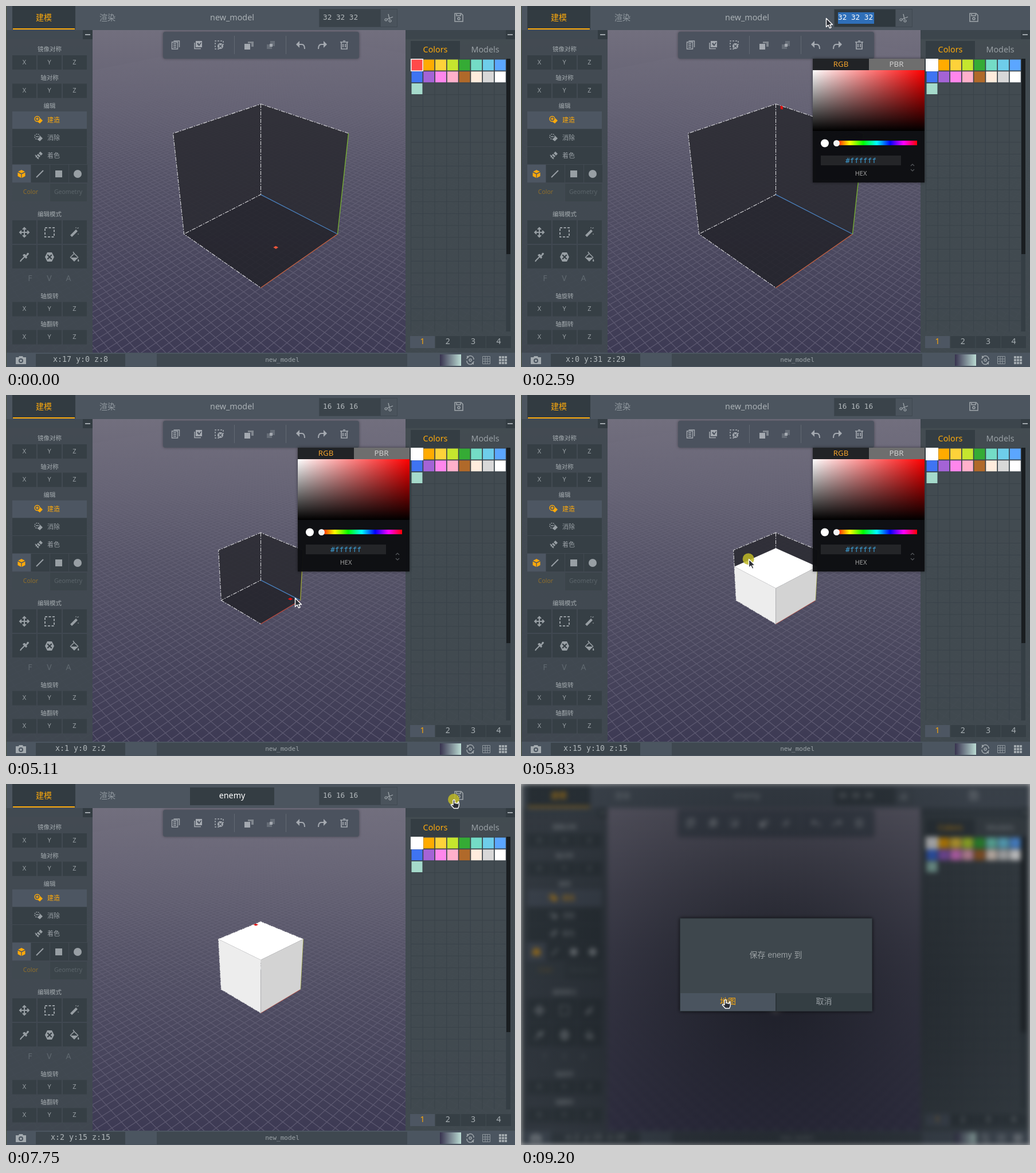
These frames come from a looping animation (888 by 630 pixels, 9250 ms). An HTML page with a canvas:

```html
<!DOCTYPE html>
<html lang="zh">
<head>
<meta charset="utf-8">
<title>Voxel editor</title>
<style>
html, body { margin: 0; width: 100%; height: 100%; overflow: hidden; background: #414a52; }
canvas { display: block; width: 888px; height: 630px; }
</style>
</head>
<body>
<canvas id="stage" width="888" height="630"></canvas>
<script>
const W = 888, H = 630, LOOP = 9250, STEP = 120, FIRST = 310;
const stage = document.getElementById('stage').getContext('2d');
const layer = document.createElement('canvas');
layer.width = W;
layer.height = H;
const g = layer.getContext('2d');

const UI = '"Noto Sans", "Noto Sans CJK SC", "Noto Sans CJK", sans-serif';
const MONO = '"DejaVu Sans Mono", monospace';
const DARK = '#363f45', LIT = '#4d5662', GOLD = '#fca90c', GREY = '#989fa4';

const clamp = (v, a = 0, b = 1) => Math.min(b, Math.max(a, v));

function box(c, x0, y0, x1, y1, fill) {
  c.fillStyle = fill;
  c.fillRect(x0, y0, x1 - x0, y1 - y0);
}

function text(c, s, x, y, size, fill, align = 'center', family = UI) {
  c.font = `${size}px ${family}`;
  c.textAlign = align;
  c.textBaseline = 'middle';
  c.fillStyle = fill;
  c.fillText(s, x, y + 0.5);
}

function disc(c, x, y, r, fill) {
  c.beginPath();
  c.arc(x, y, r, 0, Math.PI * 2);
  c.fillStyle = fill;
  c.fill();
}

// Icons are drawn around their own centre.
function icon(x, y, color, solid, outline, width = 1.5) {
  g.save();
  g.translate(x, y);
  g.fillStyle = g.strokeStyle = color;
  g.lineWidth = width;
  if (solid) g.fill(new Path2D(solid), 'evenodd');
  if (outline) g.stroke(new Path2D(outline));
  g.restore();
}

// ---- timeline ----

const PATH = [
  [310, 722, 104], [670, 722, 104], [1150, 600, 135], [1510, 485, 96], [1630, 480, 91],
  [1990, 604, 21], [2110, 604, 21], [2350, 532, 21], [4270, 532, 21], [5110, 504, 354],
  [5230, 510, 357], [5950, 374, 272], [6070, 374, 272], [6310, 434, 246], [6430, 428, 120],
  [6550, 424, 21], [7390, 424, 21], [7750, 781, 27], [7870, 781, 27], [8110, 690, 78],
  [8830, 356, 376], [9250, 356, 376]
];
const PRESSED = [[430, 550], [910, 1750], [2110, 2590], [5230, 6190], [6550, 6790], [7750, 7870], [9050, 9150]];
const HOVER = [
  [0, 17, 0, 8, 'floor'], [1750, 0, 31, 29, 'wall'], [4390, 0, 15, 6, 'wall'], [4750, 0, 11, 4, 'wall'],
  [4870, 0, 7, 3, 'wall'], [4990, 0, 3, 2, 'wall'], [5110, 1, 0, 2, 'floor'], [5230, 0, 0, 0, 'floor'],
  [5350, 15, 15, 15, ''], [6190, 12, 15, 13, 'top'], [6310, 5, 15, 14, 'top'], [6430, 2, 15, 15, 'top']
];

function pointer(t) {
  const i = PATH.findIndex(p => p[0] > t);
  const [t0, x0, y0] = PATH[i - 1], [t1, x1, y1] = PATH[i];
  const k = (t - t0) / (t1 - t0);
  return { x: x0 + (x1 - x0) * k, y: y0 + (y1 - y0) * k };
}

function pickedColor(t) {
  if (t < 910) return [255, 74, 74];
  if (t >= 1510) return [255, 255, 255];
  const p = pointer(t);
  const sat = clamp((p.x - 509) / 195), val = clamp(1 - (p.y - 112) / 106);
  const low = Math.round(255 * val * (1 - sat));
  return [Math.round(255 * val), low, low];
}

function filled(t) {
  if (t < 5350) return null;
  const n = clamp(((t - 5350) / STEP + 1) / 6) * 2;
  const side = Math.ceil(16 * Math.min(1, n));
  return [side, Math.max(1, Math.ceil(16 * (n - 1))), side];
}

function stateAt(time) {
  const t = time < FIRST ? 0 : FIRST + STEP * Math.floor((time - FIRST) / STEP);
  const s = { t, size: t < 4150 ? 32 : 16, rgb: pickedColor(t), fill: filled(t) };
  s.hover = HOVER.filter(h => h[0] <= t).pop();
  if (s.fill && t < 6190) s.hover = [t, ...s.fill.map(n => n - 1), ''];
  s.picker = t >= 550 && t < 7750;
  s.dims = t < 2830 ? '32 32 32' : '16 16 16'.slice(0, (t - 2830) / STEP + 1);
  s.dimsFocus = t >= 2110 && t < 4390;
  s.dimsMark = t >= 2230 && t < 2830 ? (t < 2350 ? 565 : 553) : 0;
  s.title = t < 6910 ? 'new_model' : 'enemy'.slice(0, (t - 6910) / STEP + 1);
  s.titleFocus = t >= 6550 && t < 7990;
  s.titleMark = t === 6790;
  s.dim = t < 7870 ? 0 : t < 7990 ? 1 : 2;
  s.dialog = t >= 8110;
  s.cursor = t ? pointer(t) : null;
  s.press = PRESSED.some(([a, b]) => (time >= 9050 ? time : t) >= a && (time >= 9050 ? time : t) < b);
  return s;
}

// ---- 3D scene ----

const FOCAL = 760, DIST = 120.4, SIN = 0.5, COS = 0.866, R2 = Math.SQRT2;

function project(size, x, y, z) {
  const u = (size - x - z) / R2, d = (z - x) / R2, h = y - size / 2;
  const depth = DIST + d * COS - h * SIN;
  return [444.5 + FOCAL * u / depth, 316 - FOCAL * (d * SIN + h * COS) / depth];
}

function trace(size, points, close) {
  g.beginPath();
  points.forEach(p => g.lineTo(...project(size, ...p)));
  if (close) g.closePath();
}

function face(size, points, fill) {
  trace(size, points, true);
  g.fillStyle = fill;
  g.fill();
}

function edge(size, points, color) {
  trace(size, points);
  g.strokeStyle = color;
  g.stroke();
}

function floorGrid(size) {
  const fade = g.createLinearGradient(0, 50, 0, 600);
  fade.addColorStop(0, 'rgba(170,165,180,0)');
  fade.addColorStop(0.3, 'rgba(160,155,175,.1)');
  fade.addColorStop(1, 'rgba(160,155,175,.3)');
  g.strokeStyle = fade;
  g.lineWidth = 1.3;
  g.beginPath();
  for (let i = -220; i <= 220; i += 2) {
    // Each line stops before it passes behind the camera.
    const near = Math.min(220, i + 140), far = Math.max(-220, i - 140);
    g.moveTo(...project(size, near, 0, i));
    g.lineTo(...project(size, -220, 0, i));
    g.moveTo(...project(size, i, 0, far));
    g.lineTo(...project(size, i, 0, 220));
  }
  g.stroke();
}

function scene(s) {
  const n = s.size;
  const sky = g.createLinearGradient(0, 42, 0, 605);
  sky.addColorStop(0, '#726f7e');
  sky.addColorStop(0.45, '#555367');
  sky.addColorStop(1, '#3d3a54');
  box(g, 0, 0, W, H, sky);
  floorGrid(n);

  face(n, [[0, 0, 0], [n, 0, 0], [n, 0, n], [0, 0, n]], 'rgba(34,34,41,.86)');
  face(n, [[0, 0, 0], [0, n, 0], [0, n, n], [0, 0, n]], 'rgba(42,42,49,.87)');
  face(n, [[n, 0, n], [n, n, n], [0, n, n], [0, 0, n]], 'rgba(42,42,49,.87)');
  g.lineWidth = 1.1;
  g.setLineDash([7, 2, 2, 2]);
  edge(n, [[0, n, 0], [0, n, n], [n, n, n], [n, 0, n], [n, 0, 0]], '#d5d5d8');
  edge(n, [[0, n, n], [0, 0, n], [n, 0, n]], '#d5d5d8');
  g.setLineDash([]);
  g.lineWidth = 1.3;
  edge(n, [[0, 0, 0], [n, 0, 0]], n === 32 ? '#c6603e' : '#b8483c');
  edge(n, [[0, 0, 0], [0, 0, n]], '#4a80bd');
  edge(n, [[0, 0, 0], [0, n, 0]], n === 32 ? '#79b432' : '#a0a83a');

  if (s.fill) {
    const [x, y, z] = s.fill;
    face(n, [[0, y, 0], [x, y, 0], [x, y, z], [0, y, z]], '#fff');
    face(n, [[x, 0, 0], [x, y, 0], [x, y, z], [x, 0, z]], '#ededed');
    face(n, [[0, 0, 0], [0, y, 0], [x, y, 0], [x, 0, 0]], '#d3d3d3');
  }
  const [, x, y, z, side] = s.hover;
  const color = s.t < 1750 ? '#ea553b' : '#e01212';
  if (side === 'wall') face(n, [[0, y, z], [0, y + 1, z], [0, y + 1, z + 1], [0, y, z + 1]], color);
  else if (side) {
    const top = side === 'top' ? y + 1 : y;
    face(n, [[x, top, z], [x + 1, top, z], [x + 1, top, z + 1], [x, top, z + 1]], color);
  }
}

// ---- interface ----

const ARROWS = 'M0-8V8M-8 0H8M-3-5L0-8L3-5M-3 5L0 8L3 5M-5-3L-8 0L-5 3M5-3L8 0L5 3';
const RING = 'M2-2a4.5 4.5 0 1 0-9 0a4.5 4.5 0 1 0 9 0';
const BLOCK = 'M3-3L7 1L2 6L-2 3Z';

function topBar(s) {
  box(g, 0, 0, W, 42, '#4c555f');
  box(g, 11, 0, 121, 41, '#323b41');
  box(g, 12, 39, 120, 41, GOLD);
  text(g, '建模', 66, 21, 14, GOLD);
  text(g, '渲染', 177, 21, 14, '#929aa0');
  if (s.titleFocus) box(g, 321, 6, 468, 37, '#343d43');
  if (s.titleMark) box(g, 357, 11, 432, 31, '#2f6fb8');
  text(g, s.title, 394.5, 20.5, 14.3, s.titleFocus ? '#fff' : '#a9b0b4');
  box(g, 546, 5, 683, 37, '#3f4850');
  box(g, 547, 6, 653, 36, s.dimsFocus ? '#2f383e' : '#3a434a');
  if (s.dimsMark) box(g, s.dimsMark, 11, 616, 31, '#2f6fb8');
  text(g, s.dims, 553, 20.5, 12.7, s.dimsFocus ? '#fff' : '#b4babd', 'left', MONO);
  box(g, 654, 6, 682, 36, '#4a535c');
  icon(668, 21, '#a3aaaf', '', 'M-1-7L1 2M7-2L-3 2M-3 3a2 2 0 1 0-4 0a2 2 0 1 0 4 0M4 5a2 2 0 1 0-4 0a2 2 0 1 0 4 0', 1.2);
  icon(790, 20, '#a0a7ac', '', 'M-7-7H4L7-4V7H-7ZM-4-6V-3H3V-6M2 2a2 2 0 1 0-4 0a2 2 0 1 0 4 0', 1.5);
}

function axisRow(label, y) {
  text(g, label, 76, y, 10.5, '#a4abaf');
  ['X', 'Y', 'Z'].forEach((c, i) => {
    box(g, 11 + 44 * i, y + 10, 53 + 44 * i, y + 35, DARK);
    text(g, c, 32 + 43.7 * i, y + 22, 11, GREY);
  });
}

function leftPanel() {
  box(g, 0, 42, 151, 605, 'rgba(64,73,80,.94)');
  box(g, 0, 42, 151, 58, '#414a52');
  box(g, 134, 42, 151, 58, '#333c42');
  box(g, 138, 49, 147, 51, '#a0a7ac');
  axisRow('镜像对称', 76);
  axisRow('轴对称', 125.5);
  axisRow('轴旋转', 506.5);
  axisRow('轴翻转', 555.5);
  text(g, '编辑', 76, 174.5, 10.5, '#a4abaf');
  text(g, '编辑模式', 76, 363.5, 10.5, '#a4abaf');

  ['建造', '消除', '着色'].forEach((label, i) => {
    const y = 199 + 31 * i;
    box(g, 11, y - 15, 141, y + 15, i ? DARK : LIT);
    text(g, label, 83, y, 11, i ? GREY : GOLD);
  });
  icon(57, 199, GOLD, BLOCK, RING + 'M-5-2H0M-2.5-4.5V.5', 1.4);
  g.setLineDash([2, 1.5]);
  icon(57, 230, GREY, BLOCK, RING, 1.4);
  g.setLineDash([]);
  icon(57, 230, GREY, '', 'M-5-2H0', 1.4);
  icon(57, 261, GREY, 'M3-7L7-3L4 0L0-4ZM-1-3L3 1L1 3L-3-1Z', 'M-6-1L0 6M-3 0L-5 3M0 3L-3 5', 1.5);

  for (let i = 0; i < 4; i++) box(g, 11 + 33 * i, 277, 43 + 33 * i, 308, i ? DARK : LIT);
  icon(27, 293, GOLD, 'M0-7L6-4L0-1L-6-4ZM-6.5-2.5L-.6 .5V7L-6.5 4ZM6.5-2.5L.6 .5V7L6.5 4Z');
  icon(59, 293, GREY, '', 'M-6 6L6-6', 2);
  box(g, 86, 287, 98, 299, GREY);
  disc(g, 125, 293, 7, GREY);
  box(g, 11, 310, 75, 341, '#404950');
  box(g, 77, 310, 141, 341, '#3b444a');
  text(g, 'Color', 43, 325, 10.5, '#8d6e2c');
  text(g, 'Geometry', 108.5, 325, 10.5, '#5b646a');

  for (let i = 0; i < 6; i++) {
    const x = 11 + 44 * (i % 3), y = i < 3 ? 374 : 417;
    box(g, x, y, x + 42, y + 41, DARK);
  }
  icon(32, 395, GREY, '', ARROWS, 2);
  g.setLineDash([4, 2.5]);
  icon(76, 395, GREY, '', 'M-8-8H8V8H-8Z', 2);
  g.setLineDash([]);
  icon(119, 395, GREY, 'M-7 5L3-5L6-2L-4 8ZM2-8l1-1l1 1l-1 1ZM6 3l1-1l1 1l-1 1Z', 'M5-7L8-8', 1);
  icon(32, 438, GREY, 'M1-5L3-3L5-7Q8-8 8-5L4-1L5 1L3 3L-3-3L-1-5Z', 'M1-1L-6 6L-7 8', 2);
  icon(76, 438, GREY, 'M-4-8H4L8 0L4 8H-4L-8 0ZM-3-4.5L-4.5-3L-1.5 0L-4.5 3L-3 4.5L0 1.5L3 4.5L4.5 3L1.5 0L4.5-3L3-4.5L0-1.5Z');
  icon(119, 438, GREY, 'M-7 1H7L0 8ZM7 3Q10 8 7 8Q5 8 7 3Z', 'M-7 1L0-6L7 1M0-6L-2-9', 1.5);
  ['F', 'V', 'A'].forEach((c, i) => text(g, c, 42 + 33.5 * i, 475.5, 14, '#606970'));
}

const SWATCHES = ('ff4a4a ffab00 fdd23a c5e62e 35ab35 74dcc6 6ecdea 5ba6ff ' +
  '3f74f2 a463d6 ff86ec ffb0cb b0692a ffecdd d8d8d8 ffffff a5dacb').split(' ');

function rightPanel(s) {
  box(g, 697, 42, W, 605, 'rgba(65,74,80,.95)');
  box(g, 697, 42, W, 58, '#3c454c');
  box(g, 872, 42, W, 58, '#333c42');
  box(g, 875, 49, 884, 51, '#a0a7ac');
  box(g, 706, 61, 792, 92, '#343d43');
  text(g, 'Colors', 749, 76.5, 14.3, GOLD);
  text(g, 'Models', 836, 76.5, 14.3, GREY);

  const pitch = 20.75;
  g.strokeStyle = '#394249';
  g.lineWidth = 1;
  g.beginPath();
  for (let i = 0; i <= 8; i++) {
    g.moveTo(706.5 + i * pitch, 92);
    g.lineTo(706.5 + i * pitch, 568);
  }
  for (let y = 92.5; y < 569; y += pitch) {
    g.moveTo(706, y);
    g.lineTo(872, y);
  }
  g.stroke();
  const current = `rgb(${s.rgb})`;
  SWATCHES.forEach((hex, i) => {
    const x = 707 + (i % 8) * pitch, y = 93 + (i >> 3) * pitch;
    if (i) box(g, x + 0.5, y + 0.5, x + 19.5, y + 19.5, '#' + hex);
  });
  box(g, 706, 92, 728, 114, '#fff');
  box(g, 707.5, 93.5, 726.5, 112.5, current);
  box(g, 873, 92, 880, 568, '#353e44');
  box(g, 873, 92, 880, 433, '#191d20');

  for (let i = 0; i < 4; i++) {
    const x = 705 + 44.3 * i;
    box(g, x, 576, x + 43, 597, i ? '#363f45' : LIT);
    text(g, i + 1, x + 21.5, 586, 14, i ? '#a9b0b4' : GOLD);
  }
}

function bottomBar(s) {
  box(g, 0, 605, W, H, '#4b5560');
  box(g, 52, 607, 208, 629, '#3b444b');
  box(g, 263, 607, 700, 629, '#3f4850');
  const [, x, y, z] = s.hover;
  text(g, `x:${x} y:${y} z:${z}`, 130, 617.5, 13.3, '#b0b7ba', 'center', MONO);
  text(g, 'new_model', 482, 617.5, 11, '#9ca3a8', 'center', MONO);
  icon(26, 618, '#a3aaaf', 'M-9-5H-4L-3-7H3L4-5H9V7H-9ZM4 1a4 4 0 1 0-8 0a4 4 0 1 0 8 0M2 1a2 2 0 1 0-4 0a2 2 0 1 0 4 0');
  const ramp = g.createLinearGradient(757, 0, 794, 0);
  ramp.addColorStop(0, '#37324e');
  ramp.addColorStop(1, '#bcdcd4');
  box(g, 757, 608, 794, 628, ramp);
  icon(810, 618, '#9fa6ab', 'M-6-3L-6-8L-2-5ZM6 3L6 8L2 5Z', 'M-6-2A6 6 0 0 1 6-1M6 2A6 6 0 0 1-6 1M2 0a2 2 0 1 0-4 0a2 2 0 1 0 4 0');
  icon(838, 618, '#8f979d', '', 'M-6.5-6.5H6.5V6.5H-6.5ZM-2-6.5V6.5M2-6.5V6.5M-6.5-2H6.5M-6.5 2H6.5', 1);
  for (let i = 0; i < 9; i++) {
    const px = 860 + (i % 3) * 5, py = 611 + Math.floor(i / 3) * 5;
    box(g, px, py, px + 4, py + 4, '#a3aaaf');
  }
}

function toolbar() {
  g.save();
  g.shadowColor = 'rgba(0,0,0,.35)';
  g.shadowBlur = 5;
  g.fillStyle = '#4b525e';
  g.beginPath();
  g.roundRect(274, 45, 342, 47, 4);
  g.fill();
  g.restore();
  const c = '#a4a9b0', dull = '#80868e';
  icon(296, 68, c, '', 'M-3.5-7H6.5V4M-6.5-5H3.5V7H-6.5ZM-4-2H1M-4 1H1M-4 4H1', 1.4);
  icon(335, 68, c, 'M-4-7H7V4H-4ZM-2-2L0-4L2-1L5-5L6-4L2 2Z', 'M-6-4V6.5H5', 1.5);
  g.setLineDash([3, 2]);
  icon(372, 68, c, '', 'M0 7H-7V-7H7V0', 1.5);
  g.setLineDash([]);
  icon(374, 70, c, 'M5 0a5 5 0 1 0-10 0a5 5 0 1 0 10 0M-2-3L-3-2L-1 0L-3 2L-2 3L0 1L2 3L3 2L1 0L3-2L2-3L0-1Z');
  box(g, 398, 52, 399, 84, '#626973');
  box(g, 488, 52, 489, 84, '#626973');
  icon(424, 68, c, 'M-8-2H2V8H-8Z');
  icon(424, 68, dull, 'M-2-6H8V3H4V-3H-2Z');
  icon(462, 68, '#666d77', 'M-7-1H2V7H-7ZM-1-7H7V2H-1Z');
  icon(462, 68, c, 'M-2-2H3V3H-2Z');
  icon(514, 68, c, 'M-8-1L-2-7V5Z', 'M-3-1H2Q7-1 7 7', 2);
  icon(552, 68, c, 'M8-1L2-7V5Z', 'M3-1H-2Q-7-1-7 7', 2);
  icon(590, 68, c, '', 'M-7-5H7M-2-7H2M-5-5V7H5V-5M-2-2V4M2-2V4', 1.7);
}

function picker(s) {
  g.save();
  g.shadowColor = 'rgba(0,0,0,.5)';
  g.shadowBlur = 5;
  box(g, 509, 92, 704, 308, 'rgba(13,14,18,.94)');
  g.restore();
  box(g, 509, 92, 607, 112, '#212326');
  box(g, 607, 92, 704, 112, '#6e6e6e');
  text(g, 'RGB', 558, 101.5, 13.3, '#f3a32c');
  text(g, 'PBR', 655, 101.5, 13.3, '#d0d0d0');
  const sat = g.createLinearGradient(509, 0, 704, 0);
  sat.addColorStop(0, '#fff');
  sat.addColorStop(1, '#f00');
  box(g, 509, 112, 704, 218, sat);
  const val = g.createLinearGradient(0, 112, 0, 218);
  val.addColorStop(0, 'rgba(0,0,0,0)');
  val.addColorStop(1, '#000');
  box(g, 509, 112, 704, 218, val);
  const hue = g.createLinearGradient(550, 0, 691, 0);
  for (let i = 0; i <= 6; i++) hue.addColorStop(i / 6, `hsl(${i * 60},100%,50%)`);
  box(g, 550, 235, 691, 243, hue);
  disc(g, 530, 239.5, 7, `rgb(${s.rgb})`);
  disc(g, 550.5, 239.5, 5.5, '#f2f2f2');
  box(g, 523, 261, 663, 278, '#242528');
  const hex = '#' + s.rgb.map(v => v.toString(16).padStart(2, '0')).join('');
  text(g, hex, 593, 270, 12.8, '#3d9fd6', 'center', MONO);
  text(g, 'HEX', 593, 292.5, 11, '#a0a0a0');
  icon(683, 281, '#55585c', '', 'M-3-2L0-5L3-2M-3 4L0 7L3 4', 1.2);
}

// ---- overlay, dialog and pointer ----

// The blur fades towards a light backing along the stage border.
function blurred(regions) {
  stage.save();
  stage.beginPath();
  regions.forEach(r => stage.rect(...r));
  stage.clip();
  box(stage, 0, 0, W, H, '#fff');
  stage.filter = 'blur(4px)';
  stage.drawImage(layer, 0, 0);
  stage.restore();
}

function shade(inner, outer, x, w, y = 0, h = H) {
  const dark = stage.createRadialGradient(444, 350, 60, 444, 350, 470);
  dark.addColorStop(0, `rgba(12,15,20,${inner})`);
  dark.addColorStop(1, `rgba(12,15,20,${outer})`);
  stage.fillStyle = dark;
  stage.fillRect(x, y, w, h);
}

function veil(level) {
  if (level === 1) {
    blurred([[0, 0, W, 42], [151, 42, 546, 563], [0, 605, W, 25]]);
    shade(0.7, 0.3, 0, W, 0, 42);
    shade(0.7, 0.3, 151, 546, 42, 563);
    shade(0.7, 0.3, 0, W, 605, 25);
    shade(0.5, 0.19, 0, 151, 42, 563);
    shade(0.5, 0.19, 697, 191, 42, 563);
  } else if (level === 2) {
    blurred([[0, 0, W, H]]);
    shade(0.7, 0.31, 0, W);
  }
}

function dialog(hover) {
  stage.save();
  stage.shadowColor = 'rgba(0,0,0,.7)';
  stage.shadowBlur = 6;
  box(stage, 277, 234, 613, 397, '#2c3439');
  stage.restore();
  box(stage, 278, 235, 612, 365, '#3e474d');
  text(stage, '保存 enemy 到', 444.5, 299, 14, '#9aa0a3', 'center',
    '"Liberation Sans", "Noto Sans CJK SC", "Noto Sans CJK", sans-serif');
  box(stage, 278, 365, 444, 396, hover ? '#4a545f' : '#343e43');
  box(stage, 446, 365, 612, 396, '#343e43');
  text(stage, '地图', 361, 380, 14, hover ? GOLD : GREY);
  text(stage, '取消', 528.5, 380, 14, GREY);
}

const ARROW = new Path2D('M0 0V15L3.5 11.8L6 17L8.6 16L6.3 11H11Z');
const HAND = new Path2D('M-1.5 1Q0-1 1.5 1V6Q3 4.5 4 6.5Q5.5 5 6.5 7Q8-1 9 8Q9 12 7 15H0L-5 9.5Q-5 7-2.5 8.5L-1.5 9Z');
const BEAM = new Path2D('M-3-7H3M0-7V8M-3 8H3');

function drawPointer(s, hover) {
  const { x, y } = s.cursor;
  if (s.press) disc(stage, x + (s.dialog ? 2 : 0), y + (s.dialog ? 8 : 0), 10, 'rgba(190,184,38,.85)');
  const onTitle = x > 321 && x < 468 && y < 37;
  const onDims = x > 547 && x < 653 && y < 37;
  stage.save();
  stage.translate(Math.round(x) + 0.5, Math.round(y) + 0.5);
  stage.lineJoin = 'round';
  stage.strokeStyle = '#fff';
  stage.fillStyle = '#2b2e36';
  stage.lineWidth = 1.4;
  if (onTitle || onDims) {
    stage.lineWidth = 2;
    stage.stroke(BEAM);
  } else {
    const shape = hover || (x > 770 && y < 42) ? HAND : ARROW;
    stage.fill(shape);
    stage.stroke(shape);
  }
  stage.restore();
}

function render(s) {
  scene(s);
  toolbar();
  leftPanel();
  rightPanel(s);
  topBar(s);
  bottomBar(s);
  box(g, 0, 0, 1, H, '#4f5642');
  if (s.picker) picker(s);

  stage.drawImage(layer, 0, 0);
  veil(s.dim);
  const c = s.cursor;
  const hover = s.dialog && c.x > 278 && c.x < 444 && c.y > 365 && c.y < 396;
  if (s.dialog) dialog(hover);
  if (c) drawPointer(s, hover);
}

let shown = '';
const start = performance.now();
function tick() {
  const s = stateAt((performance.now() - start) % LOOP);
  const key = s.t + ':' + s.press;
  if (key !== shown) {
    render(s);
    shown = key;
  }
  requestAnimationFrame(tick);
}
tick();
</script>
</body>
</html>
```
